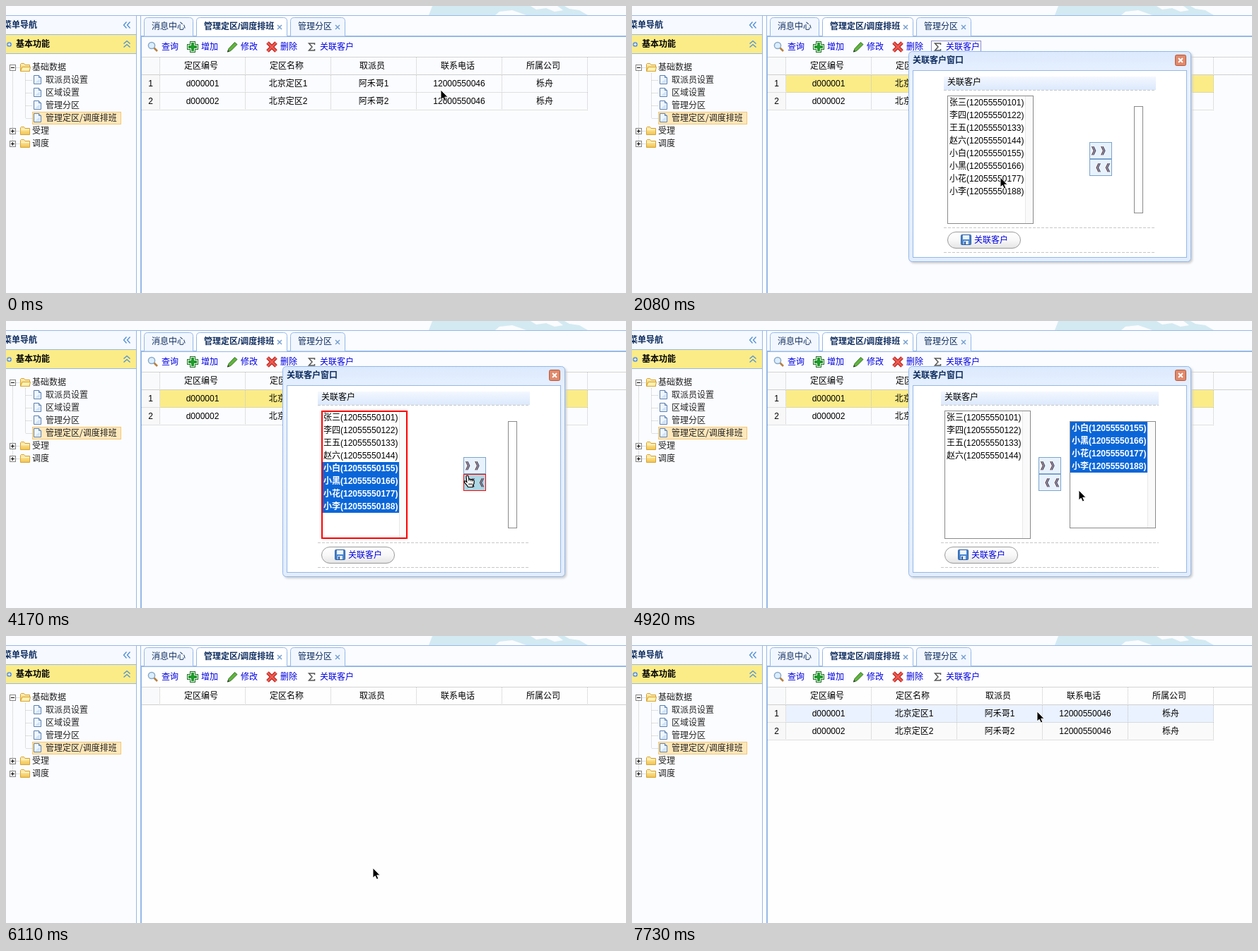
Write an HTML page that moves like this. It is 877 by 407 pixels and loops after 8 s.

```html
<!DOCTYPE html>
<html lang="zh-CN">
<head>
<meta charset="utf-8">
<title>管理定区</title>
<style>
html, body { margin: 0; width: 100%; height: 100%; overflow: hidden; background: #fff; }
svg { display: block; width: 100%; height: 100%; }
text { font: 12px "Liberation Sans", "Noto Sans CJK SC", "Noto Sans CJK", sans-serif; white-space: pre; }
.tree text { font-family: "Noto Sans CJK SC", "Noto Sans CJK", sans-serif; }
.b { font-weight: bold; }
.shadow { filter: drop-shadow(2px 2px 1.5px #ccc); }
</style>
</head>
<body>
<svg viewBox="0 0 877 407">
  <defs>
    <linearGradient id="frame" x2="0" y2="1"><stop stop-color="#dce9fd"/><stop offset=".12" stop-color="#e9f2ff"/><stop offset="1" stop-color="#e2edff"/></linearGradient>
    <linearGradient id="strip" x2="0" y2="1"><stop stop-color="#f4f8ff"/><stop offset="1" stop-color="#dbe8fc"/></linearGradient>
    <linearGradient id="pill" x2="0" y2="1"><stop stop-color="#fff"/><stop offset=".5" stop-color="#f8f8f8"/><stop offset="1" stop-color="#e4e4e4"/></linearGradient>
    <linearGradient id="fold" x2="0" y2="1"><stop stop-color="#fff3bd"/><stop offset="1" stop-color="#f2c34c"/></linearGradient>
  </defs>
  <g id="stage"></g>
</svg>
<script>
const LOOP = 8000;
const BLUE = '#95b8e7', LINK = '#0000e0', NAVY = '#0e2d5f', YELLOW = '#fbec88', HOVER = '#eaf2ff';

const HEADS = ['定区编号', '定区名称', '取派员', '联系电话', '所属公司'];
const ROWS = [1, 2].map(n => ['d00000' + n, '北京定区' + n, '阿禾哥' + n, '12000550046', '栎舟']);
const CLIENTS = ['张三(12055550101)', '李四(12055550122)', '王五(12055550133)', '赵六(12055550144)',
  '小白(12055550155)', '小黑(12055550166)', '小花(12055550177)', '小李(12055550188)'];

// time, x, y, hand
const POINTER = [
  [0, 615, 119], [150, 613, 114], [590, 612, 112], [890, 603, 103], [1040, 576, 85], [1190, 532, 68],
  [1330, 490, 60, 1], [1480, 481, 59, 1], [1780, 490, 120], [1930, 508, 190], [2080, 521, 243],
  [2230, 520, 234], [2380, 517, 220], [2530, 515, 210], [2680, 514, 207], [2830, 514, 210],
  [2980, 514, 226], [3130, 514, 243], [3280, 515, 258], [3430, 516, 263], [3720, 552, 256],
  [3870, 600, 241], [4020, 638, 228], [4170, 653, 219, 1], [4320, 655, 212, 1], [4470, 657, 206, 1],
  [4770, 658, 206], [4920, 632, 240], [5070, 590, 285], [5220, 547, 318], [5370, 518, 329, 1],
  [6110, 519, 329], [6860, 521, 318], [7010, 525, 290], [7150, 533, 245], [7300, 545, 192],
  [7440, 558, 140], [7590, 570, 112], [7730, 573, 107]
];

const within = (t, a, b) => t >= a && t < b;
const fill = (x, y, w, h, c) => `<rect x="${x}" y="${y}" width="${w}" height="${h}" fill="${c}"/>`;
const box = (x, y, w, h, c, line, r = 0) =>
  `<rect x="${x + .5}" y="${y + .5}" width="${w - 1}" height="${h - 1}" rx="${r}" fill="${c}" stroke="${line}"/>`;
const path = (d, c, line = 'none', w = 1) => `<path d="${d}" fill="${c}" stroke="${line}" stroke-width="${w}"/>`;
const dots = (d, c = '#c4c4c4', dash = '1 1') =>
  `<path d="${d}" fill="none" stroke="${c}" stroke-dasharray="${dash}"/>`;
const at = (x, y, s) => `<g transform="translate(${x} ${y})">${s}</g>`;
// y is the middle of the line
const text = (x, y, s, c = '#000', bold = 0, anchor = 'start') =>
  `<text x="${x}" y="${y + 4}" fill="${c}" text-anchor="${anchor}"${bold ? ' class="b"' : ''}>${s}</text>`;
const mid = (x, y, s, c, bold) => text(x, y, s, c, bold, 'middle');

const page = (x, y) => at(x, y,
  path('M.5 .5H7.5L10.5 3.5V12.5H.5Z', '#eef6ff', '#5b7fae') + path('M7.5 .5V3.5H10.5', '#b9d3f0', '#5b7fae') +
  path('M2 11L9 5V11Z', '#cfe3f8'));
const folder = (x, y, open) => at(x, y,
  path('M.5 11.5V1.5L1.5 .5H5.5L7 2.5H13.5V11.5Z', 'url(#fold)', '#d5a336') +
  (open ? path('M.5 11.5L3 5.5H14.5L13 11.5Z', '#fff0b0', '#d5a336') : path('M1 4.5H13', 'none', '#fff5cf')));
const expander = (x, y, plus) => box(x, y, 9, 9, '#fff', '#848484') +
  fill(x + 2, y + 4, 5, 1, '#000') + (plus ? fill(x + 4, y + 2, 1, 5, '#000') : '');
const chevrons = (x, y, turn) => `<g transform="translate(${x} ${y}) rotate(${turn})">` +
  path('M-.5 -4.5L-4.5 0L-.5 4.5M4.5 -4.5L.5 0L4.5 4.5', 'none', '#4f8fd6', 1.3) + '</g>';
const cross = (x, y) => path(`M${x - 3} ${y - 3}l6 6m0 -6l-6 6`, 'none', '#6f9bd0', 1.4);

function sidebar() {
  let s = fill(0, 14, 184, 393, '#fbfcff') + fill(0, 14, 184, 26, '#f6f9ff') + fill(0, 40, 184, 1, BLUE) +
    fill(0, 41, 184, 26, YELLOW) + fill(0, 67, 184, 1, BLUE) + fill(184, 13, 1, 394, BLUE) +
    text(-4, 27, '菜单导航', NAVY, 1) + text(14, 54, '基本功能', '#000', 1) +
    chevrons(171, 27, 0) + chevrons(171, 54, 90) +
    '<circle cx="4.5" cy="54.5" r="3.5" fill="#6b9bdc"/>' + path('M2.5 54.5h4M4.5 52.5v4', 'none', '#fff') +
    dots('M9.5 92V195M10 87.5H20M10 177.5H20M10 195.5H20M27.5 95V159M28 105.5H37M28 123.5H37M28 141.5H37M28 159.5H37') +
    box(37, 150, 126, 18, '#ffe8bb', '#f3c777') + '<g class="tree">';
  s += folder(20, 81, 1) + text(37, 87, '基础数据', '#222');
  ['取派员设置', '区域设置', '管理分区', '管理定区/调度排班'].forEach((n, i) => {
    s += page(39, 98 + 18 * i) + text(56, 105 + 18 * i, n, '#222');
  });
  ['受理', '调度'].forEach((n, i) => {
    s += expander(5, 173 + 18 * i, 1) + folder(20, 171 + 18 * i) + text(37, 177 + 18 * i, n, '#222');
  });
  return s + expander(5, 83) + '</g>';
}

function shell(bg) {
  const tab = (x, w, c) => path(`M${x + .5} 42.5V21.5Q${x + .5} 16.5 ${x + 5.5} 16.5H${x + w - 5.5}Q${x + w - .5} 16.5 ${x + w - .5} 21.5V42.5`, c, BLUE);
  return fill(0, 0, 877, 407, '#fbfcff') +
    path('M598 13L603 0H790L797 4 811 6 823 13Z', '#d4eaf2') +
    path('M692 13L698 8 716 6 736 13ZM742 0L750 5 764 3 776 8 788 6 780 0Z', '#fbfcff') +
    fill(0, 13, 877, 1, BLUE) + sidebar() + fill(185, 14, 5, 393, '#fff') + fill(190, 13, 1, 394, BLUE) +
    fill(191, 43, 686, 364, bg) + fill(191, 42, 686, 1, BLUE) +
    tab(195, 70, '#f2f7ff') + tab(269, 129, '#fff') + tab(402, 78, '#f2f7ff') + fill(270, 42, 127, 1, '#fff') +
    text(206, 29, '消息中心', NAVY) + text(280, 29, '管理定区/调度排班', NAVY, 1) + text(413, 29, '管理分区', NAVY) +
    cross(387, 30) + cross(469, 30);
}

function toolbar(hover, focus) {
  const plus = (r, c, w) => path(`M264 ${58 - r}V${58 + r}M${264 - r} 58H${264 + r}`, 'none', c, w);
  const icons =
    path('M209 59L214 64', 'none', '#b9803f', 2.6) +
    '<circle cx="206" cy="56" r="4.6" fill="#dcefff" stroke="#8aa9c8" stroke-width="1.5"/>' +
    plus(8, '#1c6e22', 8) + plus(7, '#f2fbf0', 6) + plus(6, '#1f9a2b', 4) +
    path('M313.500 65L315 60.500L323.500 51.500L327 54.500L318 63.500Z', '#5fb53c', '#39702a') + path('M313 65.500l1-3 2 2z', '#333') +
    path('M370 52L382 64M382 52L370 64', 'none', '#b3201c', 5) + path('M370 52L382 64M382 52L370 64', 'none', '#ee5a50', 2.8) +
    path('M436.500 55V53H428.500L433 58L428.500 63H436.500V61', 'none', '#555', 1.5);
  const ring = focus ? dots('M423.500 49.500H493.500V66.500H423.500Z', '#22228a') : '';
  return fill(191, 43, 686, 1, BLUE) + fill(191, 43, 1, 364, BLUE) + fill(192, 72, 685, 1, '#d4d4d4') +
    (hover ? box(418, 46, 80, 24, '#eef3fb', '#b7d2ff', 5) : '') + icons + ring +
    ['查询', '增加', '修改', '删除'].map((n, i) => text(220 + 56 * i, 58, n, LINK)).join('') +
    text(444, 58, '关联客户', hover ? '#222' : LINK);
}

function grid(tints, filled) {
  let s = fill(192, 73, 25, 24, '#f9fafb') + fill(192, 97, 685, 1, '#cfcfcf') + dots('M217.500 73V97');
  HEADS.forEach((n, i) => {
    s += mid(276 + 121 * i, 85, n) + dots(`M${338.5 + 121 * i} 73V97`);
  });
  if (!filled) return s;
  ROWS.forEach((row, r) => {
    const y = 98 + 25 * r;
    s += fill(192, y, 25, 24, '#f8f8f8') + (tints[r] ? fill(218, y, 605, 25, tints[r]) : '') + mid(204.5, y + 12, r + 1) +
      dots(`M192 ${y + 24.5}H823M217.500 ${y}V${y + 24}`);
    row.forEach((v, i) => {
      s += mid(278 + 121 * i, y + 12, v) + dots(`M${338.5 + 121 * i} ${y}V${y + 24}`);
    });
  });
  return s;
}

const option = (x, y, s, on) => (on ? fill(x, y, 109, 18, '#0a66d8') : '') + text(x + 2, y + 9, s, on ? '#fff' : '#000', on);

// brackets are set one by one so that each keeps its full width
function moveButton(x, y, s, hot) {
  const label = (d, col) => [...s].map((ch, i) =>
    `<text x="${x + 2.7 + d + 13.3 * i}" y="${y + 17}" fill="${col}" style="font-size:13.33px">${ch}</text>`).join('');
  return box(x, y, 32, 24, hot ? '#add8e6' : '#e8f2fd', hot ? '#f00' : '#7ba3cc') +
    label(-.5, '#f0a090') + label(.5, '#90a0f0') + label(0, '#111');
}

function dialog(t) {
  const moved = t >= 4770, focus = within(t, 2680, 4620);
  const x0 = moved ? 437 : 441, w = moved ? 308 : 300, lx = x0 + 5, bx = moved ? 575 : 647;
  const picked = Math.max(0, Math.min(4, Math.floor((t - 2680) / 150)));
  const rule = y => dots(`M${x0} ${y}h${w}`, '#c8c8c8', '4 2');
  let s = `<g class="shadow">${box(391, 64, 400, 299, 'url(#frame)', BLUE, 5)}</g>` + box(397, 91, 388, 266, '#fff', BLUE) +
    text(397, 77, '关联客户窗口', NAVY, 1) +
    box(768, 69, 16, 16, '#e08a6c', '#b9573a', 2) + path('M773 74l6 6m0-6l-6 6', 'none', '#fff', 2) +
    fill(x0, 100, w, 19, 'url(#strip)') + rule(119.5) + text(lx, 108, '关联客户') +
    box(lx, 127, 122, 182, '#fff', '#8a8a8a') + fill(lx + 110, 128, 11, 180, '#fafafa') +
    fill(lx + 110, 128, 1, 180, '#e8e8e8');
  CLIENTS.slice(0, moved ? 4 : 8).forEach((n, i) => {
    s += option(lx + 1, 128 + 18 * i, n, !moved && i > 3 && i < 4 + picked);
  });
  if (focus) s += path(`M${lx + 1} 128h120v180h-120z`, 'none', '#f00', 2);
  s += moveButton(bx, 193, '》》', within(t, 4320, 4770)) + moveButton(bx, 217, '《《', within(t, 4170, 4320));
  if (moved) {
    s += box(619, 142, 122, 152, '#fff', '#8a8a8a') + fill(729, 143, 11, 150, '#fafafa') + fill(729, 143, 1, 150, '#e8e8e8');
    CLIENTS.slice(4).forEach((n, i) => { s += option(620, 143 + 18 * i, n, 1); });
  } else s += box(710, 142, 13, 152, '#fff', '#8a8a8a');
  return s + rule(314.5) + rule(349.5) + box(lx, 320, 104, 24, 'url(#pill)', '#9a9a9a', 11.5) +
    at(lx + 19, 324, box(0, 0, 15, 15, '#4a86cf', '#2b5c9e', 1) + fill(3, 1, 9, 6, '#eaf4ff') + fill(4, 9, 7, 5, '#dfe8f2') + fill(5, 10, 2, 4, '#2b5c9e')) +
    text(lx + 38, 332, '关联客户', LINK);
}

function pointer(t) {
  const [, x, y, hand] = POINTER.filter(p => p[0] <= t).pop();
  return at(x, y, hand
    ? path('M-2 1.500Q-1.800 0 -.5 0T1 1.500L1.800 5.600Q3 4.400 4.200 6Q5.600 5 6.400 6.600Q9 6 9.200 8.200L9 11.500L7.500 14V16.500H.5L-.5 14.500L-4.500 10Q-5.400 7.800 -3.400 7.800L-1.200 9.600Z', '#fff', '#000', 1.2) +
      path('M1.800 5.600V8M4.200 6V8.400M6.400 6.600V8.800M2 11V14M4 11V14M6 11V14', 'none', '#000', .8)
    : path('M0 0V14L3.200 11.200L5.400 16L7.800 15L5.700 10.200H10Z', '#000', '#fff', .9));
}

function rowTints(t) {
  if (t < 590) return [];
  if (t < 740) return [HOVER];
  if (t < 5670) return [YELLOW];
  if (t < 7440) return [];
  return t < 7590 ? ['', HOVER] : [HOVER, '#fafafa'];
}

function scene(t) {
  let s = shell(t < 5670 ? '#fbfcff' : '#fefefe');
  if (!within(t, 5670, 6110)) {
    s += toolbar(within(t, 1330, 1780), within(t, 1480, 2680)) + grid(rowTints(t), t < 5670 || t >= 6260);
  }
  if (within(t, 1630, 5670)) s += dialog(t);
  return s + pointer(t);
}

const stage = document.getElementById('stage');
let shown = '';
const start = performance.now();
function draw() {
  const next = scene((performance.now() - start) % LOOP);
  if (next !== shown) stage.innerHTML = shown = next;
  requestAnimationFrame(draw);
}
draw();
</script>
</body>
</html>
```
